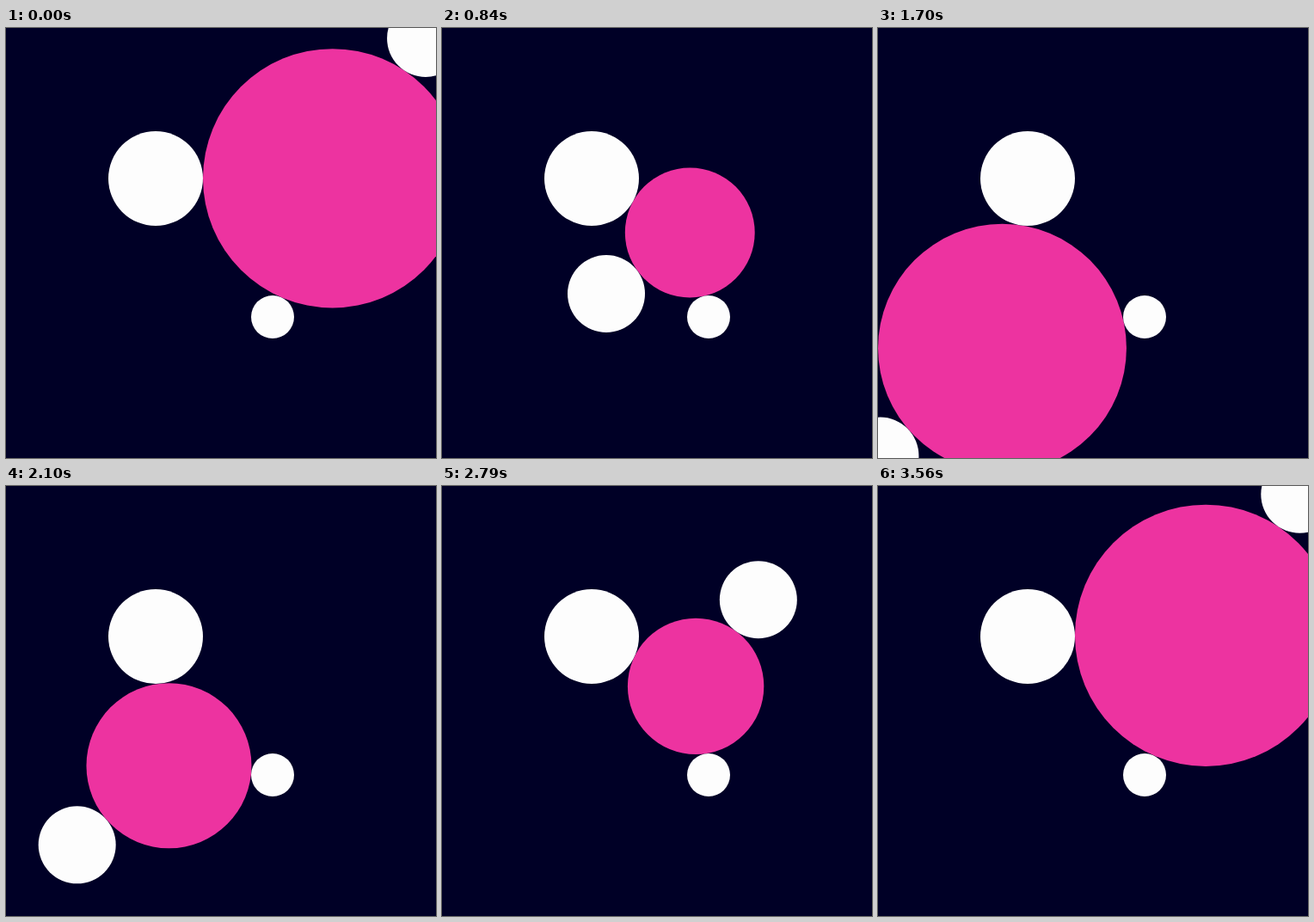
Write an HTML page that moves like this. It is 500 by 500 pixels and loops after 3.58 s.

```html
<!DOCTYPE html>
<html lang="en">
<head>
<meta charset="utf-8">
<title>Tangent circles</title>
<style>
  html, body { margin: 0; width: 100%; height: 100%; overflow: hidden; background: #000026; }
  svg { display: block; width: 100vw; height: 100vh; }
  circle { fill: #fdfdfd; }
  #kiss { fill: #ed33a0; }
</style>
</head>
<body>
<svg viewBox="0 0 500 500">
  <g transform="translate(250 250)">
    <circle id="kiss"/>
    <circle cx="-76" cy="-75" r="55"/>
    <circle cx="60" cy="86" r="25"/>
    <circle id="mover" r="45"/>
  </g>
</svg>
<script>
const LOOP = 3580;
const A = { x: -76, y: -75, r: 55 };
const B = { x: 60, y: 86, r: 25 };
const kiss = document.getElementById('kiss');
const mover = document.getElementById('mover');

// [time in ms, phase of the swing, steps until the next key]
const keys = [
  [0, 0.3104, 26], [550, 1.287, 14], [840, 1.809, 19], [1240, 2.5134, 42],
  [2100, 3.9792, 33], [2790, 5.2032, 37], [3560, 6.5627, 1], [LOOP, 6.5936, 1]
];

function phaseAt(t) {
  let i = 0;
  while (t >= keys[i + 1][0]) i++;
  const [t0, p0, steps] = keys[i];
  const [t1, p1] = keys[i + 1];
  const u = Math.floor((t - t0) / (t1 - t0) * steps) / steps;
  return p0 + (p1 - p0) * u;
}

// Linear equation m*x + n*y = k*r + c for centres tangent to both A and o.
function between(o) {
  const sq = c => c.x * c.x + c.y * c.y - c.r * c.r;
  return {
    m: 2 * (o.x - A.x),
    n: 2 * (o.y - A.y),
    k: 2 * (A.r - o.r),
    c: sq(o) - sq(A)
  };
}

// Apollonius circle touching A, B and C from outside.
function tangent(C) {
  const e = between(B), f = between(C);
  const det = (e.m * f.n - e.n * f.m) || 1e-6;
  const xk = (e.k * f.n - e.n * f.k) / det, xc = (e.c * f.n - e.n * f.c) / det;
  const yk = (e.m * f.k - f.m * e.k) / det, yc = (e.m * f.c - f.m * e.c) / det;
  const dx = xc - A.x, dy = yc - A.y;
  const a = xk * xk + yk * yk - 1;
  const b = 2 * (xk * dx + yk * dy - A.r);
  const c = dx * dx + dy * dy - A.r * A.r;
  const r = (-b - Math.sqrt(Math.max(0, b * b - 4 * a * c))) / (2 * a);
  return { x: xk * r + xc, y: yk * r + yc, r: Math.abs(r) };
}

function place(el, c) {
  el.setAttribute('cx', c.x);
  el.setAttribute('cy', c.y);
  el.setAttribute('r', c.r);
}

function draw(t) {
  const d = 250 * Math.cos(phaseAt(t));
  const C = { x: d, y: -d, r: 45 };
  place(mover, C);
  place(kiss, tangent(C));
}

const start = performance.now();
function tick() {
  draw((performance.now() - start) % LOOP);
  requestAnimationFrame(tick);
}
draw(0);
requestAnimationFrame(tick);
</script>
</body>
</html>
```
